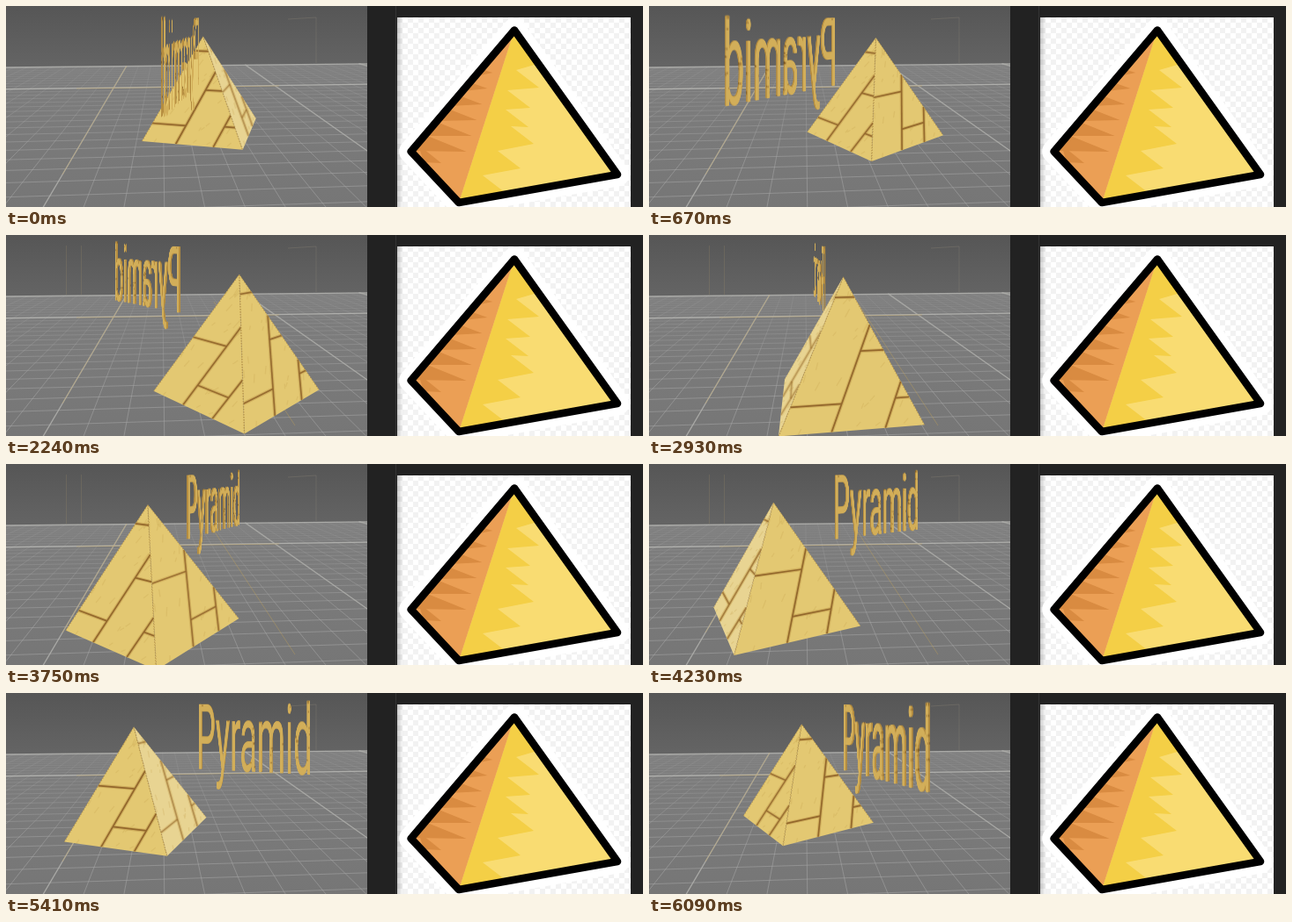
Animation, 723 px wide and 229 px high, one loop 6.12 s. Source, as an HTML page with a canvas:

```html
<!DOCTYPE html>
<html lang="en">
<head>
<meta charset="utf-8">
<title>Pyramid</title>
<style>
html, body { margin: 0; width: 723px; height: 229px; overflow: hidden; background: #222; }
canvas { display: block; }
</style>
</head>
<body>
<canvas id="stage" width="723" height="229"></canvas>
<script>
const W = 723, H = 229, VIEW_W = 410, LOOP = 6120;
const ctx = document.getElementById('stage').getContext('2d');

// Steady spin in degrees per ms, with one hard step back late in the loop.
const SPIN = 0.054, CUT = 5375;
const turnAt = t => (t < CUT ? 10 : -8) + SPIN * t;

// Camera and orbit; lengths are pixels at the depth of the axis.
const CENTER_X = 238, AXIS = -26, DEPTH = 430, PITCH = 0.0008;
const ORBIT = 63, GROUND = 160, APEX = 36, HALF_DIAG = 85;
const rad = deg => deg * Math.PI / 180;

// The camera looks down, so higher points are nearer.
function project([x, y, z]) {
  const s = 1 / (1 + z / DEPTH - (GROUND - y) * PITCH);
  return [CENTER_X + (AXIS + x) * s, y * s];
}

function makeCanvas(w, h) {
  const c = document.createElement('canvas');
  c.width = w;
  c.height = h;
  return c;
}

function seeded(seed) {
  return () => (seed = (seed * 16807) % 2147483647) / 2147483647;
}

function trace(g, pts, close) {
  g.beginPath();
  pts.forEach(([x, y], i) => i ? g.lineTo(x, y) : g.moveTo(x, y));
  if (close) g.closePath();
}

function fillShape(g, pts, color) {
  trace(g, pts, true);
  g.fillStyle = color;
  g.fill();
}

function strokeLine(g, pts, color, width, close) {
  trace(g, pts, close);
  g.strokeStyle = color;
  g.lineWidth = width;
  g.stroke();
}

function gradient(g, [x0, y0, x1, y1], from, to) {
  const grad = g.createLinearGradient(x0, y0, x1, y1);
  grad.addColorStop(0, from);
  grad.addColorStop(1, to);
  return grad;
}

function clipRect(g, x, y, w, h) {
  g.save();
  g.beginPath();
  g.rect(x, y, w, h);
  g.clip();
}

// ---- Static scenery ----
function drawFloor(g) {
  const rowY = (k, x) => 70357 / (1035 - 27 * k) * (6905 - x) / 6700;
  const row = k => [0, VIEW_W].map(x => [x, rowY(k, x)]);
  const column = k => {
    const m = -0.588 + 0.2 * k, top = 67.8 - 0.67 * m;
    return [[177 + m * top, top], [177 + m * 240, 240]];
  };
  clipRect(g, 0, 0, VIEW_W, H);
  g.fillStyle = gradient(g, [0, 0, 0, 68], '#565656', '#646464');
  g.fillRect(0, 0, VIEW_W, H);
  const floor = gradient(g, [0, 66, 0, H], '#7e7e7e', '#767676');
  fillShape(g, [...row(0), [VIEW_W, H], [0, H]], floor);

  const minor = gradient(g, [0, 66, 0, 180], 'rgba(166,166,166,.15)', 'rgba(166,166,166,.55)');
  for (let k = 1; k < 28; k++) strokeLine(g, row(k), minor, 1);
  for (let k = -24; k < 36; k++) strokeLine(g, column(k), minor, 1);
  for (let k = 0; k <= 10; k += 10) strokeLine(g, row(k), 'rgba(182,182,178,.85)', 1.4);
  for (let k = -10; k <= 20; k += 10) strokeLine(g, column(k), 'rgba(178,178,174,.7)', 1.3);

  const gold = 'rgba(205,170,85,.35)';
  strokeLine(g, [[137, 68], [64, 192]], gold, 1);
  strokeLine(g, [[80, 94], [310, 91]], gold, 1);
  strokeLine(g, [[320, 15], [352, 13], [352, 65]], 'rgba(190,180,150,.16)', 1);
  g.restore();
}

function drawSticker(g) {
  g.fillStyle = '#222';
  g.fillRect(VIEW_W, 0, W - VIEW_W, H);
  g.fillStyle = '#343434';
  g.fillRect(442, 0, 1, H);
  clipRect(g, 444, 13, 265, H - 13);
  g.fillStyle = '#fff';
  g.fillRect(444, 13, 265, H);
  g.fillStyle = '#f2f2f2';
  for (let y = 0; y < 37; y++) {
    for (let x = y % 2; x < 45; x += 2) g.fillRect(444 + x * 6, 13 + y * 6, 6, 6);
  }
  g.fillStyle = gradient(g, [444, 0, 451, 0], 'rgba(0,0,0,.2)', 'rgba(0,0,0,0)');
  g.fillRect(444, 13, 8, H);

  const top = [577, 27.5], left = [459.7, 165.7], front = [514, 224], right = [694, 192];
  const outline = [top, right, front, left];
  g.lineJoin = 'round';
  strokeLine(g, outline, '#fff', 27, true);
  fillShape(g, outline, '#f9dc72');

  const notches = [[579, 73], [569, 96], [567, 118], [573, 137], [558, 165], [541, 193]];
  const zigzag = notches.flatMap(([x, y]) => [[x, y], [x + 26, y + 20]]);
  fillShape(g, [top, [603, 66], ...zigzag, front], '#f4cf46');

  fillShape(g, [top, left, front], '#eb9f55');
  const edge = y => [577 - (y - 28) * 0.848, y];
  for (let i = 0; i < 6; i++) {
    const y = 76 + 17 * i, [x] = edge(y);
    fillShape(g, [edge(y - 4 - 2 * i), edge(y + 4), [x + 16 + 8.5 * i, y + i]], '#d98b41');
  }
  fillShape(g, [[468, 158], [474, 178], [494, 179]], '#d98b41');
  strokeLine(g, outline, '#000', 8.6, true);
  g.restore();
}

const scenery = makeCanvas(W, H);
drawFloor(scenery.getContext('2d'));
drawSticker(scenery.getContext('2d'));

// ---- Pyramid ----
// Two slanted seams split a face into three lanes; each joint is [height, lane].
function masonry(feet, joints) {
  const slant = (foot, h) => foot + 0.47 * h;
  const seams = feet.map(foot => {
    const h = (1 - foot) / 0.97;
    return [[foot, 0], [slant(foot, h), h]];
  });
  for (const [h, lane] of joints) {
    const from = lane ? slant(feet[lane - 1], h) : h / 2;
    const to = lane < 2 ? Math.min(slant(feet[lane], h), 1 - h / 2) : 1 - h / 2;
    seams.push([[from, h], [to, h]]);
  }
  return seams;
}
const SEAMS = [
  masonry([0.38, 0.7], [[0.49, 0], [0.17, 1]]),
  masonry([0.35, 0.72], [[0.86, 0], [0.17, 0], [0.5, 1], [0.185, 2]])
];
const rnd = seeded(77);
const GRAIN = Array.from({ length: 26 }, () => {
  const h = rnd() * 0.85, u = h / 2 + rnd() * (1 - h);
  return [[u, h], [u + 0.015 + rnd() * 0.03, h + 0.02 + rnd() * 0.04]];
});

function drawFace(left, right, apex, seams) {
  const at = ([u, h]) => project(left.map((a, i) => {
    const b = right[i];
    return a + (b - a) * u + h * (apex[i] - (a + b) / 2);
  }));
  const tri = [[0, 0], [1, 0], [0.5, 1]].map(at);
  const [[x0, y0], [x1, y1], [x2, y2]] = tri;
  if ((x1 - x0) * (y2 - y0) - (y1 - y0) * (x2 - x0) >= 0) return;

  const grazing = Math.abs(right[2] - left[2]) / 120;
  const strokeAll = (lines, color, width) => lines.forEach(s => strokeLine(ctx, s.map(at), color, width));
  ctx.save();
  fillShape(ctx, tri, grazing > 0.88 ? '#e8d492' : '#e3c872');
  trace(ctx, tri, true);
  ctx.clip();
  strokeAll(GRAIN, 'rgba(196,160,78,.25)', 1.2);
  ctx.globalAlpha = 1 - 0.6 * grazing ** 6;
  strokeAll(seams, 'rgba(200,164,84,.7)', 4);
  strokeAll(seams, '#93672c', 1.7);
  ctx.setLineDash([1.5, 1.5]);
  strokeLine(ctx, [tri[0], tri[2], tri[1]], 'rgba(150,108,42,.7)', 1.3);
  ctx.restore();
}

function drawPyramid(deg) {
  const around = (a, r) => [r * Math.sin(rad(a)), r * Math.cos(rad(a))];
  const [cx, cz] = around(deg, ORBIT);
  const corner = k => {
    const [x, z] = around(deg + 48 + 90 * k, HALF_DIAG);
    return [cx + x, GROUND, cz + z];
  };
  for (let k = 0; k < 4; k++) drawFace(corner(k + 1), corner(k), [cx, APEX, cz], SEAMS[k % 2]);
}

// ---- Lettering ----
const FONT = '400 100px Roboto, Arial, sans-serif';
const WORD = 'Pyramid', WORD_H = 110, BASE_ROW = 80, BASE_Y = 80, SIZE = 0.96;
const NEAR_U = 4, FAR_U = 122, SIDE = 9, LIFT = 0.91;

function makeWord(color, fleck) {
  const probe = makeCanvas(1, 1).getContext('2d');
  probe.font = FONT;
  const c = makeCanvas(Math.ceil(probe.measureText(WORD).width), WORD_H);
  const g = c.getContext('2d');
  g.font = FONT;
  g.fillStyle = color;
  g.fillText(WORD, 0, BASE_ROW);
  g.globalCompositeOperation = 'source-atop';
  g.fillStyle = fleck;
  const r = seeded(5);
  for (let i = 0; i < 110; i++) {
    g.fillRect(Math.sqrt(r()) * c.width, r() * WORD_H, 2 + r() * 6, 1 + r() * 2);
  }
  return c;
}

const faceWord = makeWord('#d2ae59', 'rgba(128,84,28,.45)');
const sideWord = makeWord('#b58d40', 'rgba(100,66,24,.6)');

// Paints the word one screen column at a time on a plane at sideways offset v.
function drawWord(img, angle, v) {
  const s = Math.sin(angle), c = Math.cos(angle);
  const depth = u => LIFT + (u * c + v * s) / DEPTH;
  const screenX = u => CENTER_X + (AXIS + u * s - v * c) / depth(u);
  const planeU = x => {
    const d = x - CENTER_X;
    return (d * depth(0) - AXIS + v * c) / (s - d * c / DEPTH);
  };
  const toSrc = u => Math.max(0, Math.min(1, (u - NEAR_U) / (FAR_U - NEAR_U))) * img.width;
  const a = screenX(NEAR_U), b = screenX(FAR_U);
  const lo = Math.min(a, b), hi = Math.max(a, b);
  for (let x = Math.floor(lo); x < hi; x++) {
    const x0 = Math.max(lo, x), x1 = Math.min(hi, x + 1);
    const u0 = planeU(x0), u1 = planeU(x1);
    const p = toSrc(u0), q = toSrc(u1), width = Math.abs(q - p);
    if (width < 0.01) continue;
    const scale = 1 / depth((u0 + u1) / 2);
    ctx.drawImage(img, Math.min(p, q), 0, width, WORD_H,
      x0, (BASE_Y - BASE_ROW * SIZE) * scale, x1 - x0, WORD_H * SIZE * scale);
  }
}

function drawLettering(deg) {
  const angle = rad(deg - 180), back = Math.sign(Math.sin(angle));
  drawWord(sideWord, angle, SIDE + back);
  drawWord(faceWord, angle, SIDE - back);
}

// ---- Loop ----
function drawGlints(t) {
  if (t < 1300 || t > CUT) return;
  for (const x of [68.5, 85.5]) strokeLine(ctx, [[x, 12], [x, 68]], 'rgba(190,170,110,.16)', 1);
  strokeLine(ctx, [[236, 76], [328, 217]], 'rgba(205,170,85,.35)', 1);
}

function draw(t) {
  ctx.drawImage(scenery, 0, 0);
  clipRect(ctx, 0, 0, VIEW_W, H);
  drawGlints(t);
  const deg = turnAt(t);
  const parts = [drawPyramid, drawLettering];
  if (Math.cos(rad(deg)) < 0) parts.reverse();
  for (const part of parts) part(deg);
  ctx.restore();
}

const start = performance.now();
function tick() {
  draw((performance.now() - start) % LOOP);
  requestAnimationFrame(tick);
}
tick();
</script>
</body>
</html>
```
